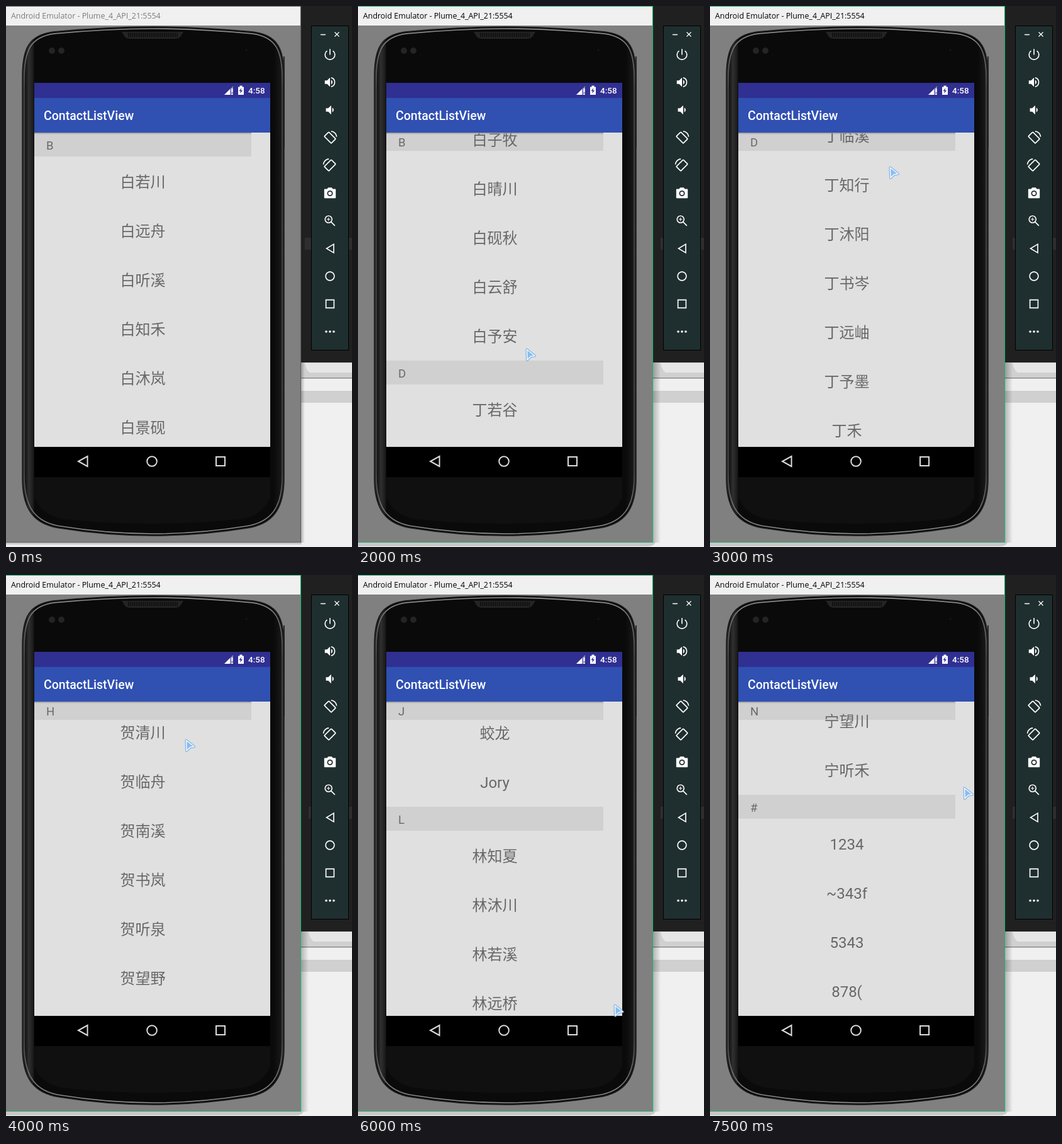
Animation, 550 px wide and 859 px high, one loop 8 s. Source, as an HTML page:

```html
<!DOCTYPE html>
<html lang="zh-CN">
<head>
<meta charset="utf-8">
<title>ContactListView</title>
<style>
html, body { margin: 0; width: 550px; height: 859px; overflow: hidden; background: #f0f0f0; }
svg { display: block; font-family: Roboto, "Noto Sans CJK SC", "Noto Sans CJK", sans-serif; }
.line { fill: none; stroke: #fff; stroke-width: 1.8; }
.bar { fill: #d0d0d0; }
#list { fill: #686868; }
.name { font-size: 24px; text-anchor: middle; }
.letter { font-size: 18.5px; }
#index { fill: #d4d4d4; font-size: 10px; font-weight: 500; text-anchor: middle; }
.big { font-size: 29px; font-weight: 400; }
#title { font: 12.4px "Open Sans", "Noto Sans", sans-serif; }
</style>
</head>
<body>
<svg width="550" height="859" viewBox="0 0 550 859">
  <defs>
    <clipPath id="view"><path d="M45 201H420V700H45z"/></clipPath>
    <linearGradient id="side">
      <stop offset="0" stop-color="#303030"/><stop offset=".012" stop-color="#161616"/>
      <stop offset=".025" stop-color="#303030"/><stop offset=".042" stop-color="#1a1a1a"/>
      <stop offset=".046" stop-color="#0a0a0a"/><stop offset=".96" stop-color="#0a0a0a"/>
      <stop offset=".985" stop-color="#161616"/><stop offset="1" stop-color="#282828"/>
    </linearGradient>
    <linearGradient id="rim" x2="0" y2="1">
      <stop stop-color="#909090"/><stop offset=".12" stop-color="#484848"/>
      <stop offset=".88" stop-color="#484848"/><stop offset="1" stop-color="#909090"/>
    </linearGradient>
    <linearGradient id="drop" x2="0" y2="1">
      <stop stop-color="#8c8c98"/><stop offset="1" stop-color="#a0a0a0" stop-opacity="0"/>
    </linearGradient>
    <linearGradient id="shade">
      <stop stop-color="#000" stop-opacity=".25"/><stop offset="1" stop-color="#000" stop-opacity="0"/>
    </linearGradient>
    <path id="body" d="M26 112C26 68 36 46 75 41Q160 33 234 33Q308 33 393 41C432 46 442 68 442 112V750C442 800 423 823 383 829Q308 841 234 841Q160 841 85 829C45 823 26 800 26 750z"/>
  </defs>

  <!-- desktop -->
  <path fill="#202020" d="M469 0H550V566H469z"/>
  <path id="stripe" fill="#2e2e2e"/>
  <path fill="#d0d0d0" d="M469 566H550V590H469zM469 611H550V630H469z"/>
  <path id="tab" fill="#e6e6e6"/>
  <path fill="#8a8a8a" d="M469 590H550V591.5H469z"/>
  <path id="shadow" fill="url(#shade)"/>
  <path id="under" fill="#c8c8c8"/>

  <!-- emulator window -->
  <path fill="#808080" d="M0 31H469V852H0z"/>
  <path fill="#f0f0f0" d="M0 0H469V31H0z"/>
  <text id="title" x="8" y="20">Android Emulator - Plume_4_API_21:5554</text>
  <path id="edge" fill="none" stroke-width="1.2" d="M0 .5H468.5V851.5H0"/>

  <!-- phone -->
  <path fill="#2c2c2c" d="M441 80H443V225H441z"/>
  <use href="#body" fill="url(#side)" stroke="#1c1c1c" stroke-width="1.5"/>
  <use href="#body" fill="none" stroke="url(#rim)" stroke-width="1.6" transform="translate(3.4 3.2) scale(.9856 .9926)"/>
  <path fill="#101010" d="M45 748H420V780Q410 806 378 814Q232 830 87 814Q55 806 45 780z"/>
  <path fill="#242424" d="M184 41H282L277 49Q274 52 268 52H198Q192 52 189 49z"/>
  <path stroke="#0c0c0c" stroke-width="7" stroke-dasharray="1.5 1.5" d="M194 46H273"/>
  <g fill="#242424"><circle cx="73" cy="71" r="5"/><circle cx="88" cy="71" r="5"/></g>
  <circle cx="382" cy="70" r="1.5" fill="#15153c"/>

  <!-- screen -->
  <path fill="#e0e0e0" d="M45 201H420V700H45z"/>
  <g id="list" clip-path="url(#view)"></g>
  <path fill="#302f92" d="M45 122H420V146H45z"/>
  <path fill="#3050b2" d="M45 146H420V201H45z"/>
  <path fill="url(#drop)" d="M45 201H390V204H45z"/>
  <text x="60" y="181" fill="#fff" font-size="19.5" font-weight="500">ContactListView</text>
  <text x="385" y="139" fill="#fff" font-size="13.5" font-weight="500">4:58</text>
  <path fill="#8988c0" d="M347 141L361 127V141z"/>
  <path fill="#fff" d="M347 141L356 132V141zM358.5 131h2v6h-2zM358.5 139h2v2h-2zM369 128.5h2.5v-2h4v2h2.5V141h-9z"/>
  <path fill="#302f92" d="M374.5 130l-4 5h2.5l-1 4 4-5h-2.5z"/>
  <path d="M45 700H420V748H45z"/>
  <g fill="none" stroke="#dcdcdc" stroke-width="2">
    <path d="M129.5 715V731L115 723zM334 716H348V730H334z"/><circle cx="232" cy="723" r="7.8"/>
  </g>
  <g id="index"></g>

  <!-- control panel -->
  <path fill="#1f2e2e" stroke="#000" d="M485.5 31.5H544.5V546.5H485.5z"/>
  <path class="line" style="stroke-width:1.3" d="M500 45.5h8M522.5 41.5l7 7m0-7l-7 7"/>
  <g id="tools" fill="#fff"></g>

  <g id="cursor" stroke-linejoin="round">
    <path id="arrow" d="M2.5 2.5L15 12.5L8.5 13.5L3 19z" fill="none" stroke="#5a9ce0" stroke-opacity=".65" stroke-width="4"/>
    <path d="M2.5 2.5L15 12.5L8.5 13.5L3 19z" fill="#86bdf2" stroke="#f4faff" stroke-width="1.5"/>
  </g>
</svg>
<script>
const $ = id => document.getElementById(id);
const ROW = 78, HEAD = 39, TOP = 201, HEIGHT = 499;

const groups = Object.entries({
  B: '白若川 白远舟 白听溪 白知禾 白沐岚 白景砚 白望秋 白泊宁 白念初 白书遥 白映雪 白朔原 白子牧 白晴川 白砚秋 白云舒 白予安',
  D: '丁若谷 丁问渠 丁听松 丁朗月 丁望舒 丁临溪 丁知行 丁沐阳 丁书岑 丁远岫 丁予墨 丁禾',
  G: '顾清禾 顾临川 顾南枝 顾书屿 顾听雨 顾望山 顾云起',
  H: '贺清川 贺临舟 贺南溪 贺书岚 贺听泉 贺望野 贺云归',
  J: '蛟龙 Jory',
  L: '林知夏 林沐川 林若溪 林远桥 林云岫',
  N: '宁望川 宁听禾',
  '#': '1234 ~343f 5343 878('
}).map(([letter, names]) => ({ letter, names: names.split(' ') }));

let end = 0;
for (const g of groups) {
  g.y = end;
  end += HEAD + ROW * g.names.length;
}

const STEP = 500;
const scrolls = [0, 0, 209, 593, 1003, 1386, 1828, 2406, 2954, 3538, 3538, 3538, 3538, 3538, 4181, 4181];
const cursors = [null, [299, 603], [273, 377], [292, 560], [266, 543], [262, 300], [284, 254], [280, 470],
  [284, 260], [281, 396], [440, 298], [409, 688], [406, 681], [407, 685], [407, 685], [402, 336]];

const text = (cls, x, y, s) => `<text class="${cls}" x="${x}" y="${y}">${s}</text>`;
const bar = (y, h) => `<rect class="bar" x="45" y="${y}" width="345" height="${h}"/>`;

function listMarkup(scroll) {
  let out = '';
  if (scroll) {
    const current = groups.filter(g => g.y <= scroll).pop();
    out += bar(TOP, 29) + text('letter', 64, 223, current.letter);
  }
  for (const g of groups) {
    const y = g.y - scroll;
    if (y >= 0 && y < HEIGHT) out += bar(TOP + y, HEAD - 1) + text('letter', 64, TOP + y + 27, g.letter);
    g.names.forEach((name, i) => {
      const mid = y + HEAD + ROW * (i + .5);
      if (mid > -20 && mid < HEIGHT + 20) out += text('name', 217.5, TOP + mid + 9, name);
    });
  }
  return out;
}

$('index').innerHTML = '<rect x="390" y="200" width="30" height="500" rx="3" fill="#000" fill-opacity=".71"/>' +
  [...'↑ABCDEFGHIJKLMNOPQRSTUVWXYZ#'].map((c, i) => text('', 405, 214.5 + i * 17.63, c)).join('') +
  '<circle cx="232" cy="450" r="49" fill="#000" fill-opacity=".71"/>' + text('big', 232, 460, '#');

// Panel icons on a 24-unit grid, one every 44 pixels
const line = d => `<path class="line" d="${d}"/>`;
const turn = '<rect class="line" x="6.5" y="3.5" width="11" height="17" rx="1" transform="rotate(-45 12 12)"/>' + line('M14 1a10.500 10.500 0 0 1 9.500 9.500');
$('tools').innerHTML = [
  line('M12 2.5v10M7 5.5a8.5 8.5 0 1 0 10 0'),
  '<path d="M3 9v6h4l5 5V4L7 9zM14 8a4.5 4.5 0 0 1 0 8z"/>' + line('M14 4.2a8 8 0 0 1 0 15.6'),
  '<path d="M5 9v6h4l5 5V4L9 9zM16 8a4.5 4.5 0 0 1 0 8z"/>',
  turn,
  `<g transform="matrix(-1 0 0 1 24 0)">${turn}</g>`,
  '<path d="M3 5h4l2-2.5h6L17 5h4q1 0 1 1v14q0 1-1 1H3q-1 0-1-1V6q0-1 1-1z"/><circle cx="12" cy="12.5" r="4" fill="#fff" stroke="#1f2e2e" stroke-width="2"/>',
  '<circle class="line" cx="9.5" cy="9.5" r="6"/>' + line('M14 14l6.5 6.5') + '<path class="line" style="stroke-width:1.2" d="M6.5 9.5h6m-3-3v6"/>',
  line('M18.5 4.5v15L6 12z'),
  '<circle class="line" cx="12" cy="12" r="7.5"/>',
  line('M5 5h14v14H5z'),
  '<circle cx="5.5" cy="12" r="2"/><circle cx="12" cy="12" r="2"/><circle cx="18.5" cy="12" r="2"/>'
].map((icon, i) => `<g transform="translate(504 ${66 + 44 * i}) scale(.917)">${icon}</g>`).join('');

function setFocus(on) {
  const x = on ? 481 : 475;
  $('title').setAttribute('fill', on ? '#000' : '#7c7c7c');
  $('edge').setAttribute('stroke', on ? '#20b070' : '#606060');
  $('stripe').setAttribute('d', `M${x} 368H550V387H${x}z`);
  $('tab').setAttribute('d', `M${x} 567H550V582H${x + 8}Q${x + 3} 580 ${x} 567z`);
  $('shadow').setAttribute('d', `M469 566H${x}V852H469z`);
  $('under').setAttribute('d', on ? 'M0 852H473Q470 858 460 858H0z' : 'M0 852H470V855H0z');
}

let shown = -1;
function draw(now) {
  const step = Math.floor(now % (STEP * 16) / STEP);
  if (step !== shown) {
    shown = step;
    setFocus(step > 1);
    $('list').innerHTML = listMarkup(scrolls[step]);
    $('index').style.display = step === 13 ? '' : 'none';
    const at = cursors[step];
    $('cursor').style.display = at ? '' : 'none';
    if (at) $('cursor').setAttribute('transform', `translate(${at})`);
  }
  requestAnimationFrame(draw);
}
draw(performance.now());
</script>
</body>
</html>
```
